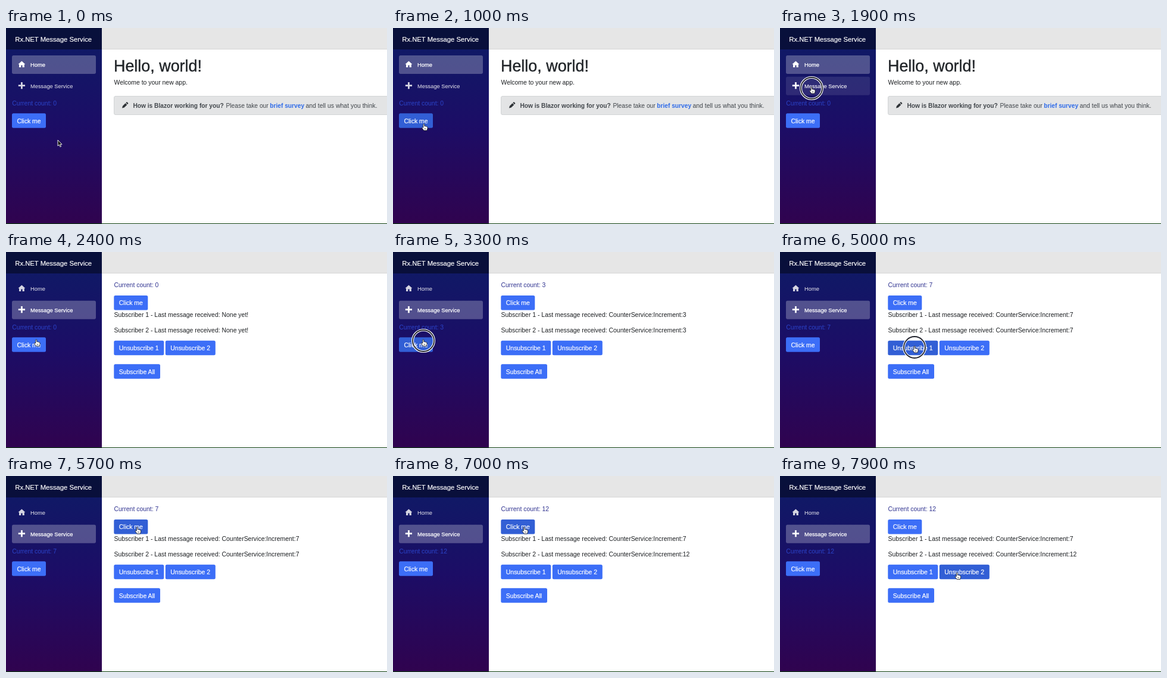
Write an HTML page that moves like this. It is 640 by 329 pixels and loops after 8000 ms.

```html
<!DOCTYPE html>
<html lang="en">
<head>
<meta charset="utf-8">
<title>Message Service</title>
<style>
  html, body { margin: 0; width: 100%; height: 100%; overflow: hidden; background: #fff; }
  svg { display: block; width: 640px; height: 329px; }
  text { font-family: "Liberation Sans", Arial, sans-serif; font-size: 10.45px; white-space: pre; }
  .white { fill: #fff; stroke: #fff; stroke-width: .2px; }
  .side { fill: #2b43c9; }
  .count { fill: #303390; }
  .body { fill: #1c1f22; }
  .alert { fill: #41464b; }
  .bold { font-weight: bold; font-size: 10.2px; }
  .nav { font-size: 9.3px; }
</style>
</head>
<body>
<svg viewBox="0 0 640 329">
  <defs>
    <linearGradient id="night" x1="0" y1="0" x2="0" y2="1">
      <stop offset="0" stop-color="#0d1c66"/>
      <stop offset=".5" stop-color="#1c0d66"/>
      <stop offset="1" stop-color="#30034f"/>
    </linearGradient>
  </defs>
  <rect width="640" height="329" fill="#fff"/>
  <rect x="161" width="479" height="36" fill="#e6e6e6"/>
  <rect x="161" y="35" width="479" height="1" fill="#d5d5d5"/>
  <rect width="161" height="329" fill="url(#night)"/>
  <rect width="161" height="36" fill="#000" opacity=".42"/>
  <text class="white" x="15.3" y="22.5" style="font-size:11.27px">Rx.NET Message Service</text>

  <g id="sidebar"></g>

  <g id="home">
    <text x="181" y="72.5" fill="#212529" stroke="#212529" stroke-width=".4" style="font-size:26.9px">Hello, world!</text>
    <text class="body" x="181.5" y="95">Welcome to your new app.</text>
    <rect x="181.5" y="114.5" width="470" height="31" rx="2.5" fill="#e3e4e5" stroke="#d2d4d6"/>
    <path d="M195 134.5l.9-3.6 4.7-4.7 2.7 2.7-4.7 4.7zM201.3 125.5l1.1-1.1q.6-.5 1.2 0l1.5 1.5q.5.6 0 1.2l-1.1 1.1z" fill="#2e3236"/>
    <text class="alert bold" x="213.4" y="134">How is Blazor working for you?</text>
    <text class="alert" x="369.5" y="134" style="font-size:10.25px">Please take our</text>
    <text class="bold" x="443.3" y="134" fill="#2f6be8">brief survey</text>
    <text class="alert" x="503.5" y="134">and tell us what you think.</text>
  </g>

  <g id="service">
    <text class="count" id="mainCount" x="181.5" y="59"></text>
    <text class="body" id="sub1" x="181.5" y="109"></text>
    <text class="body" id="sub2" x="181.5" y="134.5"></text>
  </g>

  <rect y="328" width="640" height="1" fill="#0a3d0c"/>
  <g id="pointer">
    <g id="ring" fill="none">
      <circle cy="2" r="18" stroke="#fff" stroke-width="4"/>
      <circle cy="2" r="18" stroke="#20222c" stroke-width="1.8"/>
    </g>
    <path id="arrow" d="M0 0v10l2.3-2.1 1.6 3.6 1.7-.7-1.6-3.5h3z" fill="#111" stroke="#fff" stroke-width=".9"/>
    <g id="hand" stroke="#111" stroke-width=".8" stroke-linejoin="round">
      <path d="M-1.2 6.2V.8q0-1 1-1t1 1v3q1.2-.6 1.9.3 1.2-.4 1.8.5 1.5-.3 1.5 1.2v2.1L5 11H-.3L-3 7.3q-.7-1.2.2-1.6.7-.2 1.6.5z" fill="#fff"/>
      <path d="M1.2 7.2v2M2.8 7.2v2" fill="none" stroke-width=".6"/>
    </g>
  </g>
</svg>
<script>
  const LOOP = 8000, STEP = 100, OPEN = 2000;
  const COUNTS = [2800, 3000, 3300, 3500, 3800, 4000, 4300, 5900, 6100, 6400, 6600, 6800];
  const UNSUBSCRIBE = 5000, LAST_FOR_FIRST = 7;
  const CLICKS = [...COUNTS, OPEN, UNSUBSCRIBE];

  // time, x, y of the pointer's hot spot
  const PATH = [
    [0, 87, 188], [200, 87, 188], [750, 52, 161], [1100, 52, 161],
    [1600, 53, 99], [2050, 53, 99], [2390, 51, 147], [4500, 51, 147],
    [4900, 226, 158], [5100, 226, 158], [5400, 220.5, 86], [7250, 220.5, 86],
    [7750, 297.5, 162.5], [8000, 297.5, 162.5]
  ];

  const $ = id => document.getElementById(id);

  function add(parent, tag, attrs, content = "") {
    const el = document.createElementNS("http://www.w3.org/2000/svg", tag);
    for (const key in attrs) el.setAttribute(key, attrs[key]);
    el.textContent = content;
    return parent.appendChild(el);
  }

  function navItem(label, y, icon) {
    const box = { x: 10, y, w: 141, h: 31 };
    const back = add($("sidebar"), "rect", { x: 10, y, width: 141, height: 31, rx: 2.7, fill: "#fff" });
    const mark = add($("sidebar"), "path", { d: icon });
    const text = add($("sidebar"), "text", { x: 41, y: y + 19, class: "nav" }, label);
    return { box, paint(active, over) {
      back.setAttribute("opacity", active ? .26 : over ? .1 : 0);
      const color = active || over ? "#fff" : "#d6d5e2";
      mark.setAttribute("fill", color);
      text.setAttribute("fill", color);
      text.setAttribute("stroke", color);
      text.setAttribute("stroke-width", active ? .25 : .08);
    } };
  }

  function button(parent, label, x, y, w) {
    const box = { x, y, w, h: 24.5 };
    const back = add(parent, "rect", { x, y, width: w, height: 24.5, rx: 2.5 });
    add(parent, "text", { x: x + 8.5, y: y + 16.2, class: "white" }, label);
    return { box, paint(over) { back.setAttribute("fill", over ? "#325fd5" : "#3c6ef7"); } };
  }

  const homeLink = navItem("Home", 46, "M26.4 55.6l6 5.4h-1.6v5h-3.2v-3.4h-2.4V66H22v-5h-1.6z");
  const serviceLink = navItem("Message Service", 81.7, "M25 91h2.8v4.2H32V98h-4.2v4.2H25V98h-4.2v-2.8H25z");
  const sideCount = add($("sidebar"), "text", { x: 10.3, y: 129.5, class: "side" });
  const sideButton = button($("sidebar"), "Click me", 10, 143.3, 57);
  const mainButtons = [
    ["Click me", 181.3, 73, 57],
    ["Unsubscribe 1", 181.3, 148.8, 84],
    ["Unsubscribe 2", 267.8, 148.8, 84],
    ["Subscribe All", 181.3, 188.3, 77.7]
  ].map(args => button($("service"), ...args));

  function pointerAt(t) {
    const i = Math.max(1, PATH.findIndex(p => p[0] >= t));
    const [t0, x0, y0] = PATH[i - 1], [t1, x1, y1] = PATH[i];
    const k = Math.max(0, (t - t0) / (t1 - t0));
    const e = k * k * (3 - 2 * k);
    return [x0 + (x1 - x0) * e, y0 + (y1 - y0) * e];
  }

  const inside = ([x, y], b) => x >= b.x && x <= b.x + b.w && y >= b.y && y <= b.y + b.h;
  const show = (el, on) => el.setAttribute("visibility", on ? "visible" : "hidden");
  const message = (who, n) =>
    `Subscriber ${who} - Last message received: ${n ? "CounterService:Increment:" + n : "None yet!"}`;

  function draw(t) {
    const opened = t >= OPEN;
    const count = COUNTS.filter(c => c <= t).length;
    const spot = pointerAt(t), settled = pointerAt(t - 120);
    const buttons = opened ? [sideButton, ...mainButtons] : [sideButton];

    homeLink.paint(!opened, inside(spot, homeLink.box));
    serviceLink.paint(opened, inside(spot, serviceLink.box));
    buttons.forEach(b => b.paint(inside(spot, b.box) && inside(settled, b.box)));

    $("home").style.display = opened ? "none" : "";
    $("service").style.display = opened ? "" : "none";
    sideCount.textContent = $("mainCount").textContent = "Current count: " + count;
    $("sub1").textContent = message(1, Math.min(count, LAST_FOR_FIRST));
    $("sub2").textContent = message(2, count);

    const hand = [homeLink, serviceLink, ...buttons].some(b => inside(spot, b.box));
    show($("hand"), hand);
    show($("arrow"), !hand);
    show($("ring"), CLICKS.some(c => t > c - 2 * STEP && t <= c));
    $("pointer").setAttribute("transform", `translate(${spot})`);
  }

  const start = performance.now();
  function tick() {
    const t = (performance.now() - start) % LOOP;
    draw(Math.floor(t / STEP) * STEP);
    requestAnimationFrame(tick);
  }
  tick();
</script>
</body>
</html>
```
